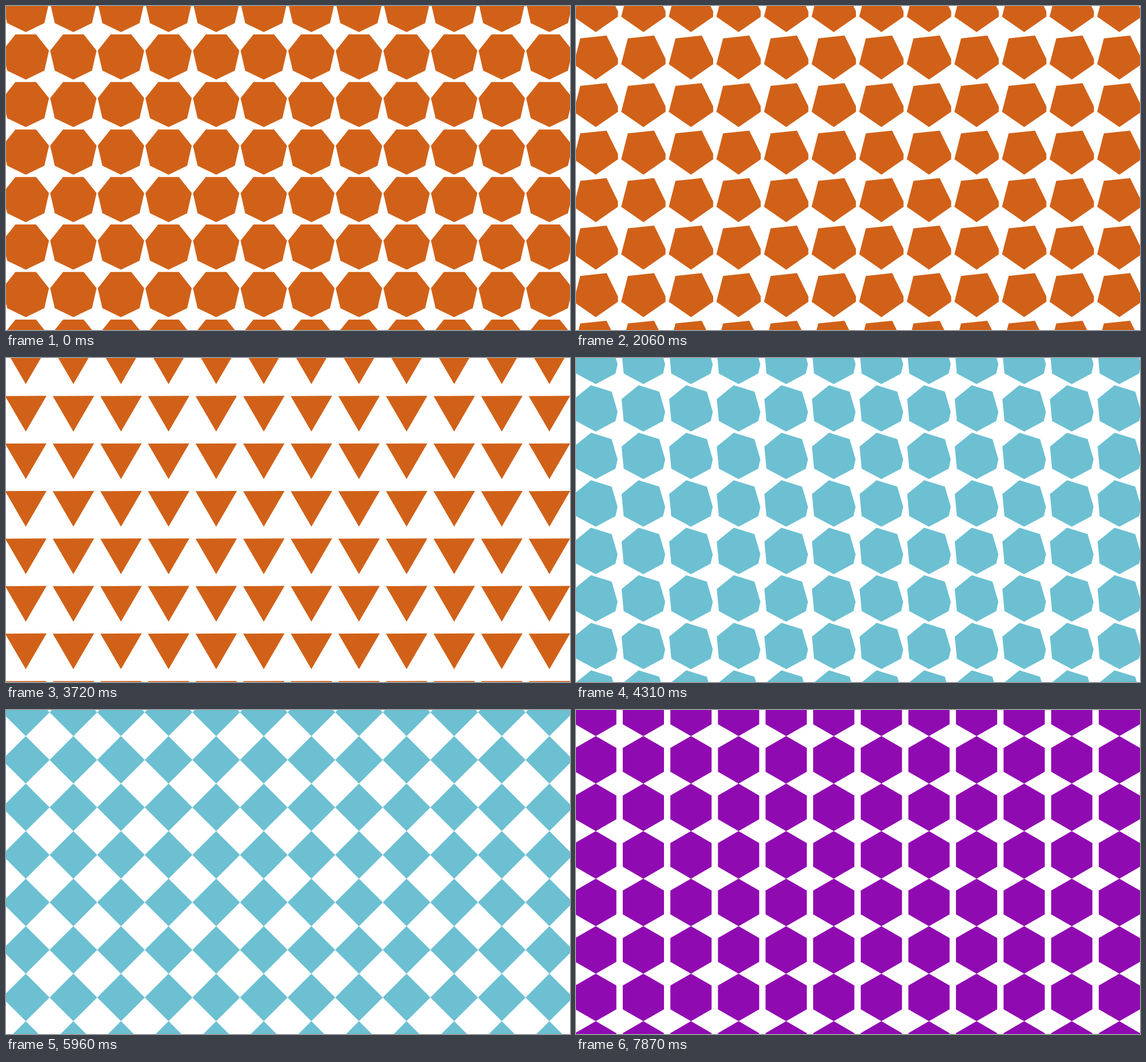
Write an HTML page with a canvas that moves like this. It is 987x568 px and loops after 8 s.

```html
<!DOCTYPE html>
<html lang="en">
<head>
<meta charset="utf-8">
<title>Polygon countdown</title>
<style>
  html, body { margin: 0; width: 100%; height: 100%; overflow: hidden; background: #fff; }
  canvas { display: block; }
</style>
</head>
<body>
<canvas id="stage" width="987" height="568"></canvas>
<script>
const ctx = document.getElementById('stage').getContext('2d');
const LOOP = 8000, STEP = 237;
const PITCH = 83.3, R = PITCH / 2, X0 = 34.6, Y0 = 87.4;
const MAX = 7;

const cycles = [
  { start: 1340, color: '#d16118' },
  { start: 4310, color: '#6cc0d2' },
  { start: 7390, color: '#900ab1' }
];

// Morph progress per step: 0 heptagon, 1 hexagon, 2 pentagon, 3 square, 4 triangle
const poses = [.54, .92, 1, 1.77, 1.97, 2.19, 2.82, 3, 3.41, 3.88, 3.99, 4];

// Regular n-gon standing on a corner; spare points pile up on the last corner
function corner(n, i) {
  const a = Math.min(i, n - 1) * 2 * Math.PI / n;
  return [-R * Math.sin(a), R * Math.cos(a)];
}

function shape(pose) {
  const n = MAX - Math.floor(pose), mix = pose % 1;
  return Array.from({ length: MAX }, (_, i) => {
    const a = corner(n, i), b = corner(n - 1, i);
    return a.map((v, d) => v + (b[d] - v) * mix);
  });
}

function stateAt(t) {
  const cycle = cycles.filter(c => t >= c.start).pop();
  if (!cycle) return { color: cycles[0].color, pose: 0 };
  const k = Math.floor((t - cycle.start + 10) / STEP);
  return { color: cycle.color, pose: poses[Math.min(k, poses.length - 1)] };
}

function draw(t) {
  const { color, pose } = stateAt(t);
  const points = shape(pose);
  ctx.fillStyle = '#fff';
  ctx.fillRect(0, 0, 987, 568);
  ctx.fillStyle = color;
  for (let row = -1; row < 7; row++) {
    for (let col = 0; col < 12; col++) {
      ctx.beginPath();
      for (const [x, y] of points) ctx.lineTo(X0 + col * PITCH + x, Y0 + row * PITCH + y);
      ctx.fill();
    }
  }
}

const begin = performance.now();
function tick() {
  draw((performance.now() - begin) % LOOP);
  requestAnimationFrame(tick);
}
tick();
</script>
</body>
</html>
```
